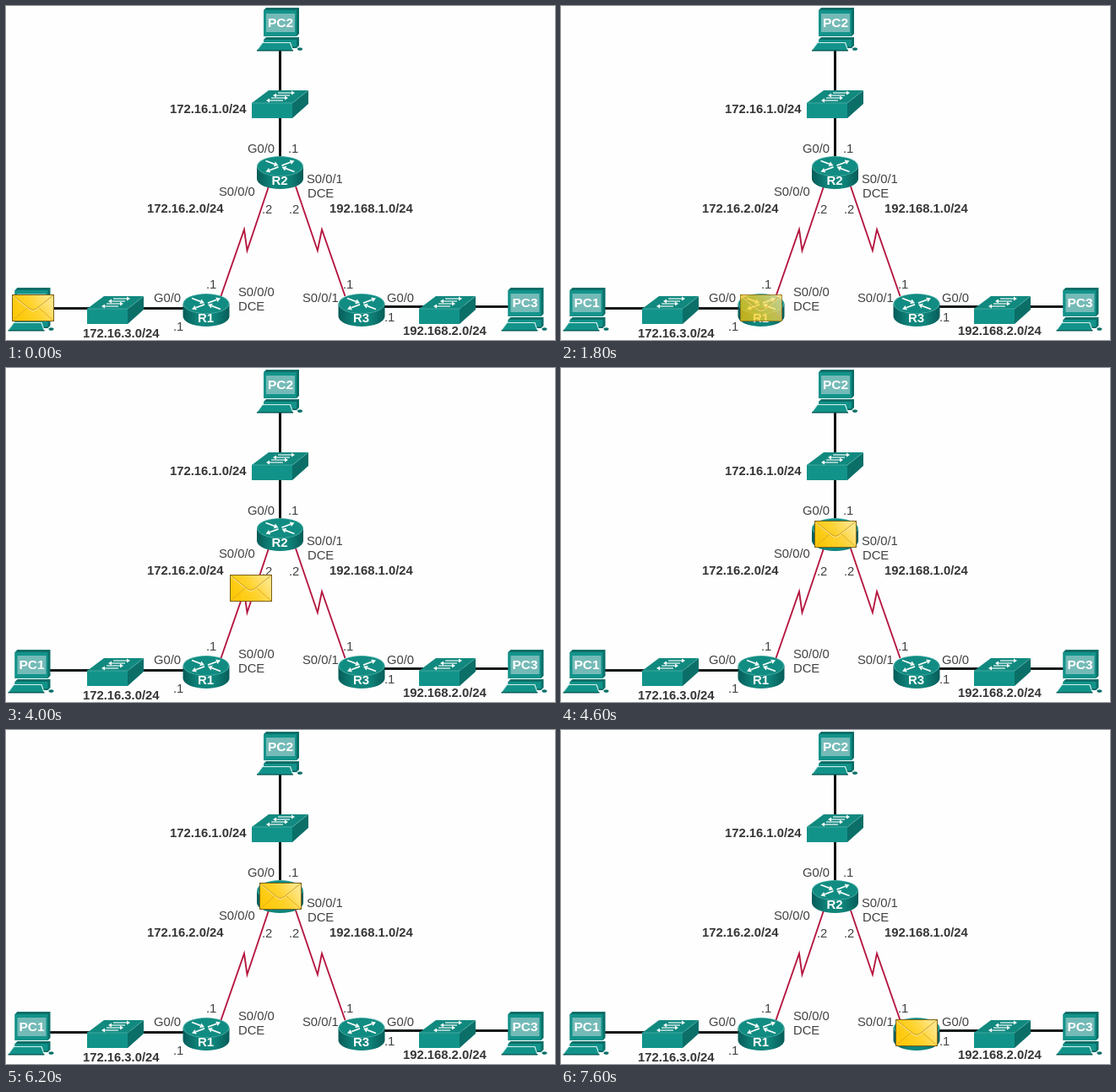
Write an HTML page with a canvas that moves like this. It is 650x396 px and loops after 8000 ms.

```html
<!DOCTYPE html>
<html lang="en">
<head>
<meta charset="utf-8">
<title>Packet path between routers</title>
<style>
html, body { margin: 0; width: 100%; height: 100%; overflow: hidden; background: #fefefe; }
canvas { display: block; width: 650px; height: 396px; }
</style>
</head>
<body>
<canvas id="stage" width="650" height="396"></canvas>
<script>
const ctx = document.getElementById('stage').getContext('2d');
const LOOP = 8000, TICK = 200;
const FONT = '"Liberation Sans", Arial, sans-serif';
const TEAL = '#12938a', DARK = '#0b6f68', EDGE = '#075c58', WHITE = '#f6fcfb';

function path(points, color, width) {
  ctx.beginPath();
  points.forEach(([x, y]) => ctx.lineTo(x, y));
  if (width) {
    ctx.strokeStyle = color;
    ctx.lineWidth = width;
    ctx.stroke();
  } else {
    ctx.fillStyle = color;
    ctx.fill();
  }
}

function box(x, y, w, h, color) {
  ctx.fillStyle = color;
  ctx.fillRect(x, y, w, h);
}

function oval(x, y, rx, ry, color) {
  ctx.beginPath();
  ctx.ellipse(x, y, rx, ry, 0, 0, Math.PI * 2);
  ctx.fillStyle = color;
  ctx.fill();
}

// Text centred on x, snapped to whole pixels
function label(str, x, y, color = '#424244', size = 14.8, weight = 'normal') {
  ctx.font = `${weight} ${size}px ${FONT}`;
  ctx.fillStyle = color;
  ctx.fillText(str, Math.round(x - ctx.measureText(str).width / 2), y);
}
const bold = (str, x, y, color = '#353537', size = 14.8) => label(str, x, y, color, size, 'bold');

function at(x, y, draw) {
  ctx.save();
  ctx.translate(x, y);
  draw();
  ctx.restore();
}

function gradient(x0, y0, x1, y1, colors) {
  const g = ctx.createLinearGradient(x0, y0, x1, y1);
  colors.forEach((c, i) => g.addColorStop(i / (colors.length - 1), c));
  return g;
}

function arrow(x0, y0, x1, y1, head, width) {
  const len = Math.hypot(x1 - x0, y1 - y0);
  const ux = (x1 - x0) / len * head, uy = (y1 - y0) / len * head;
  const bx = x1 - ux, by = y1 - uy;
  path([[x0, y0], [bx, by]], WHITE, width);
  path([[x1, y1], [bx - uy * 0.6, by + ux * 0.6], [bx + uy * 0.6, by - ux * 0.6]], WHITE);
}

function computer(x, y, name) {
  at(x, y, () => {
    path([[8, 38], [11, 35], [50, 35], [50, 45], [47, 48], [8, 48]], DARK);
    box(8, 38, 39, 8, TEAL);
    path([[8, 3], [11, 0], [50, 0], [50, 31], [47, 34], [8, 34]], DARK);
    box(8, 3, 39, 31, TEAL);
    box(11, 7, 34, 22, '#74bab7');
    path([[6, 41], [40, 41], [43, 50], [0, 50]], '#d9efed');
    path([[7, 42], [39, 42], [42, 50], [1, 50]], TEAL);
    box(0, 50, 43, 1.5, EDGE);
    oval(51, 49, 3, 1.8, DARK);
    bold(name, 28, 23, '#fff', 15.5);
  });
}

function networkSwitch(x, y) {
  at(x, y, () => {
    path([[0, 15], [20, 0], [67, 0], [48, 15]], '#11897f');
    path([[48, 15], [67, 0], [67, 16], [48, 33]], DARK);
    box(0, 15, 48, 18, TEAL);
    path([[0, 15], [48, 15], [67, 0]], '#4eb0a8', 0.8);
    for (let i = 0; i < 4; i++) {
      const mid = 40 - i * 4, y = 3 + i * 3, dir = i % 2 ? -1 : 1;
      arrow(mid - dir * 9, y, mid + dir * 11, y, 4, 1.2);
    }
  });
}

// Origin is the middle of the top disc
function router(x, y, name) {
  at(x, y, () => {
    ctx.beginPath();
    ctx.ellipse(0, 15, 27.5, 12, 0, 0, Math.PI);
    ctx.lineTo(-27.5, 0);
    ctx.lineTo(27.5, 0);
    ctx.fillStyle = gradient(-27.5, 0, 27.5, 0, [EDGE, '#0f857b', '#0f857b', EDGE]);
    ctx.fill();
    oval(0, 0, 27.5, 12, '#4dafa7');
    oval(0, 0, 26.5, 11.2, '#118c82');
    for (const s of [-1, 1]) {
      arrow(s * 17, s * 6.5, s * 2, s * 0.8, 5, 1.8);
      arrow(s * 2, -s * 0.8, s * 17, -s * 6.5, 5, 1.8);
    }
    bold(name, 0, 22, '#fff', 15);
  });
}

function envelope(x, y, alpha) {
  ctx.globalAlpha = alpha;
  at(x, y, () => {
    box(0, 0, 50, 32, gradient(8, 26, 42, 4, ['#fdc90a', '#ffd22c', '#ffe583']));
    path([[1, 31], [19, 15]], '#e3ae1c', 1);
    path([[49, 31], [31, 15]], '#e3ae1c', 1);
    for (const [dy, color] of [[1, '#fff0ae'], [0, '#cf9d20']]) {
      ctx.beginPath();
      ctx.moveTo(1, 1 + dy);
      ctx.lineTo(21, 17 + dy);
      ctx.quadraticCurveTo(25, 20 + dy, 29, 17 + dy);
      ctx.lineTo(49, 1 + dy);
      ctx.strokeStyle = color;
      ctx.lineWidth = 1;
      ctx.stroke();
    }
    ctx.strokeStyle = '#7a6018';
    ctx.strokeRect(0.5, 0.5, 49, 31);
  });
  ctx.globalAlpha = 1;
}

// Lower left (side -1) and lower right (side 1) mirror each other
function branch(side) {
  const across = (mid, off) => mid + side * off;
  const [site, port, lan, wan] = side < 0
    ? [1, 'S0/0/0', '172.16.3.0/24', '172.16.2.0/24']
    : [3, 'S0/0/1', '192.168.2.0/24', '192.168.1.0/24'];
  const cableY = 357.5 - side;

  path([[across(329, 92), cableY], [across(325, 280), cableY]], '#14191a', 3);
  path([[across(327, 16), 214], [across(327.2, 41.7), 290],
    [across(328, 46), 265], [across(328, 73.5), 344]], '#b5163f', 1.9);
  computer(across(294.5, 292), 334, 'PC' + site);
  networkSwitch(across(292.5, 196.5), 344);
  router(across(329, 92), 353, 'R' + site);

  label('.2', across(325.5, 16), 246);
  label('.1', across(324.5, 81), 335);
  label(port, across(325.4, 52), 217.5 - side * 7.5);
  label(port, across(334.5, 38), 347.5 + side * 3.5);
  label('G0/0', across(329, 138), 351);
  label('.1', across(329.5, 125), 379.5 - side * 5.5);
  bold(wan, across(322.5, 110), 245);
  bold(lan, across(328, 191.5), 391.5 - side * 1.5);
}

function diagram() {
  box(0, 0, 650, 396, '#fefefe');
  path([[324.5, 40], [324.5, 190]], '#111', 3);
  branch(-1);
  branch(1);
  computer(297, 2, 'PC2');
  networkSwitch(291, 100);
  router(324.5, 190, 'R2');
  label('G0/0', 302, 174);
  label('.1', 340, 174);
  label('DCE', 372.6, 227);
  label('DCE', 290.6, 361);
  bold('172.16.1.0/24', 239.5, 127);
}

const clamp = v => Math.max(0, Math.min(1, v));
const stops = [[7, 342], [212, 342], [299.5, 181], [396, 343]];
const legs = [{ start: 0, time: 1540 }, { start: 3200, time: 1325 }, { start: 6200, time: 1325 }];

function packet(t) {
  const i = legs.findLastIndex(leg => t >= leg.start);
  const { start, time } = legs[i];
  const p = clamp((t - start) / time);
  const [x, y] = stops[i].map((v, k) => Math.round(v + (stops[i + 1][k] - v) * p));
  // After arrival the packet fades into the router, then comes back
  const wait = t - start - time;
  const alpha = wait < 825 ? 1 - clamp((wait - 60) / 740) : clamp((wait - 850) / 350);
  envelope(x, y, i < 2 ? alpha : 1);
}

const begin = performance.now();
function frame() {
  const t = (performance.now() - begin) % LOOP;
  diagram();
  packet(Math.floor(t / TICK) * TICK);
  requestAnimationFrame(frame);
}
frame();
</script>
</body>
</html>
```
